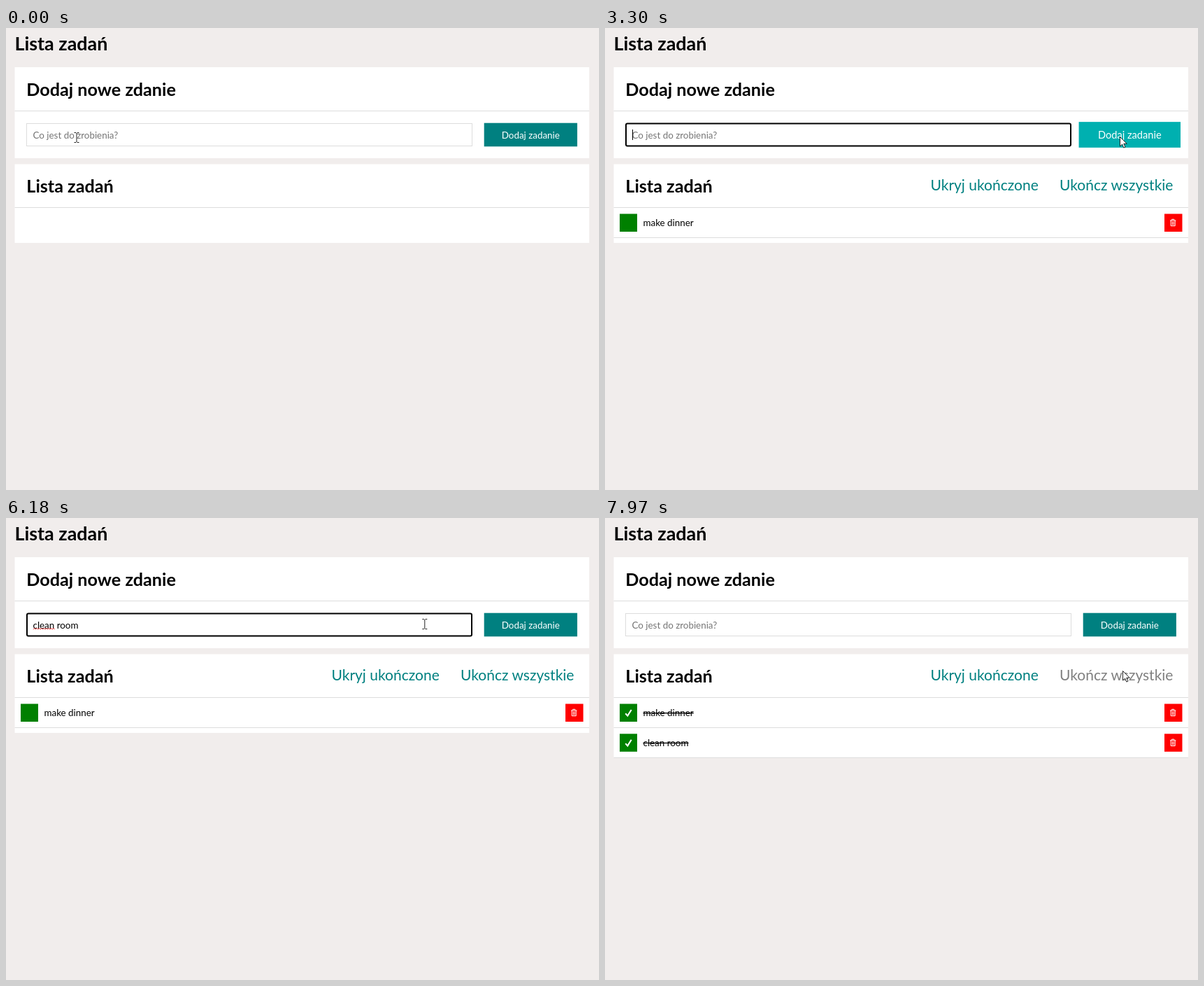
These frames come from a looping animation (848 px wide and 660 px high, 8 s). An HTML page:

```html
<!DOCTYPE html>
<html lang="pl">
<head>
<meta charset="utf-8">
<title>Lista zadań</title>
<style>
html, body { margin: 0; height: 100%; overflow: hidden; background: #f1edec; }
svg { display: block; font: 13.4px Lato, sans-serif; }
text { white-space: pre; }
.head { font-weight: 700; font-size: 25.2px; }
.link { font-size: 21px; fill: teal; }
.line { stroke: #ddd; }
.menu text { font: 10.5px "Open Sans", sans-serif; }
.menu rect { filter: drop-shadow(0 1px 1.5px #0006); }
.white { fill: none; stroke: #fff; }
</style>
</head>
<body>
<svg width="848" height="660">
  <defs>
    <g id="trash">
      <rect x="800" y="265.5" width="25.5" height="25.5" fill="red"/>
      <path class="white" d="M808 275h8.400M810.500 274.500v-1.200h3.400v1.200M809.200 275v7.700h6v-7.700M811.300 276.500v5M813.200 276.500v5"/>
    </g>
  </defs>
  <text class="head" x="12.500" y="32" style="font-size:26.900px">Lista zadań</text>
  <rect x="12.500" y="56" width="821.500" height="130" fill="#fff"/>
  <path class="line" d="M12.500 118.500h821.500"/>
  <text class="head" x="29.300" y="97">Dodaj nowe zdanie</text>

  <rect id="box" fill="#fff"/>
  <text id="typed" x="38.500" y="157.500"></text>
  <path id="wave" fill="none" stroke="#e22" stroke-width=".9"/>
  <path id="caret" stroke="#000"/>

  <g id="button">
    <rect x="-66.600" y="-16.800" width="133.200" height="33.600"/>
    <text y="5" fill="#fff" text-anchor="middle">Dodaj zadanie</text>
  </g>

  <rect id="card" x="12.500" y="194.500" width="821.500" fill="#fff"/>
  <path class="line" d="M12.500 256.500h821.500"/>
  <text class="head" x="29.300" y="235">Lista zadań</text>
  <g id="links" class="link">
    <text x="465.500" y="232">Ukryj ukończone</text>
    <text id="finish" x="650" y="232">Ukończ wszystkie</text>
  </g>
  <g id="tasks"></g>
  <g id="menu" class="menu"><rect x="29.500" y="170" width="160.500" rx="2" fill="#fff"/></g>

  <path id="beam" d="M-3.500 -6.500h2.500l1 1l1 -1h2.500M0 -5.500v12M-3.500 7.500h2.500l1 -1l1 1h2.500" fill="none" stroke="#222"/>
  <path id="arrow" d="M.5 .5v13.500l3.100 -2.900l2.200 5l2.200 -1l-2.200 -4.800h4.400z" fill="#fff" stroke="#111" stroke-width=".9"/>
</svg>
<script>
const $ = id => document.getElementById(id);
const show = (el, on) => el.style.display = on ? '' : 'none';
const set = (el, attrs) => { for (const k in attrs) el.setAttribute(k, attrs[k]); };

const LOOP = 8000, ADD1 = 3290, ADD2 = 6860, DONE = 7690;
const words = ['make dinner', 'clean room'];
const keys = [
  [730, 830, 930, 1130, 1320, 1450, 1550, 1750, 1830, 1920, 2090],
  [4180, 4610, 4710, 4740, 4900, 4980, 5060, 5200, 5400, 5520]
];
const resets = [190, ...keys[0], ADD1, 3990, ...keys[1], ADD2];
const focus = [[190, 3180], [ADD1, 6800], [ADD2, 7600]];
const hover = [[2970, 3550], [6290, 7190]];
const path = [ // time, x, y
  [0, 101, 156], [190, 101, 156], [330, 101, 155], [2350, 101, 155],
  [2620, 391, 143], [2730, 520, 130], [2840, 610, 105], [2970, 688, 148],
  [3040, 712, 164], [3150, 736, 155], [3380, 736, 155], [3550, 682, 152],
  [3780, 497, 144], [3960, 494, 150], [6050, 494, 150], [6290, 686, 152],
  [6500, 731, 147], [7090, 731, 147], [7190, 733, 171], [7450, 740, 212],
  [7600, 740, 218], [LOOP, 740, 218]
];

const within = (spans, t) => spans.some(([a, b]) => t >= a && t < b);
const count = (times, t) => times.filter(k => k <= t).length;

function pointer(t) {
  const i = path.findIndex(p => p[0] > t), [a, x, y] = path[i - 1], [b, u, v] = path[i];
  const k = (t - a) / (b - a);
  return [x + (u - x) * k, y + (v - y) * k];
}

// CSS "ease": cubic-bezier(.25, .1, .25, 1)
function ease(p) {
  if (p <= 0) return 0;
  if (p >= 1) return 1;
  let lo = 0, hi = 1, s;
  for (let i = 0; i < 20; i++) {
    s = (lo + hi) / 2;
    if (.75 * s * (1 - s) + s ** 3 < p) lo = s; else hi = s;
  }
  return .3 * s * (1 - s) ** 2 + 3 * s * s * (1 - s) + s ** 3;
}

words.forEach((word, i) => $('tasks').innerHTML += `
  <g transform="translate(0 ${i * 42.8})">
    <rect x="21" y="265.500" width="25" height="25.500" fill="green"/>
    <path class="white check" stroke-width="2.100" d="M29.300 279.300l3 3.300l5.400 -8.600"/>
    <text x="54.500" y="283">${word}</text>
    <use href="#trash"/>
    <path class="line" d="M12.500 299.500h821.500"/>
  </g>`);
const tasks = [...$('tasks').children];

['make dinner', 'clean room', 'do shopping', 'read book', 'wash dishes', 'water plants'].forEach((item, i) =>
  $('menu').innerHTML += `<text x="39.500" y="${196 + i * 29.6}">${item}</text>`);
const [menuBox, ...items] = $('menu').children;

let squiggle = '';
for (let i = 0; i < 19; i++) squiggle += `${i ? 'L' : 'M'}${39 + i * 1.7} ${i % 2 ? 157.4 : 159.2}`;
set($('wave'), { d: squiggle });

function drawInput(t) {
  const second = t >= ADD1, n = second ? 1 : 0;
  const value = t < ADD2 ? words[n].slice(0, count(keys[n], t)) : '';
  const focused = within(focus, t), typed = $('typed');
  set($('box'), focused
    ? { x: 30, y: 136.5, width: 636, height: 32, rx: 2, stroke: '#000', 'stroke-width': 2 }
    : { x: 29.5, y: 136.5, width: 637, height: 32, rx: 0, stroke: '#ddd', 'stroke-width': 1 });
  typed.textContent = value || 'Co jest do zrobienia?';
  set(typed, { fill: value ? '#000' : '#757575' });
  show($('wave'), focused && value.includes(' '));

  const last = Math.max(...resets.filter(r => r <= t));
  show($('caret'), focused && (t - last) % 1000 < 500);
  const x = 39 + (value ? typed.getSubStringLength(0, value.length) : 0);
  set($('caret'), { d: `M${Math.round(x) + .5} 145v15` });

  const rows = within([[250, 730], [4050, 4180]], t) ? 6 : within([[730, 2090]], t) ? 1 : 0;
  show($('menu'), rows);
  set(menuBox, { height: 14.4 + rows * 29.6 });
  items.forEach((el, i) => show(el, i < rows));
}

function drawButton(t) {
  let k = 0;
  for (const [a, b] of hover) k += ease((t - a) / 500) - ease((t - b) / 500);
  const tone = 128 + 52 * k;
  set($('button'), { transform: `translate(750.300 152.500) scale(${1 + .1 * k})`, fill: `rgb(0 ${tone} ${tone})` });
}

function drawList(t) {
  const n = count([ADD1, ADD2], t), done = t >= DONE;
  set($('card'), { height: n > 1 ? 148 : 112.5 });
  show($('links'), n);
  set($('finish'), { fill: done ? 'gray' : 'teal' });
  tasks.forEach((task, i) => {
    show(task, i < n);
    show(task.querySelector('.check'), done);
    task.querySelector('text').style.textDecoration = done ? 'line-through' : '';
  });
}

function drawPointer(t) {
  const [x, y] = pointer(t), inside = x > 29 && x < 667 && y > 136 && y < 169;
  show($('beam'), inside);
  show($('arrow'), !inside);
  set($(inside ? 'beam' : 'arrow'), { transform: `translate(${x} ${y})` });
}

function frame(now) {
  const t = now % LOOP;
  drawInput(t);
  drawButton(t);
  drawList(t);
  drawPointer(t);
  requestAnimationFrame(frame);
}
requestAnimationFrame(frame);
</script>
</body>
</html>
```
